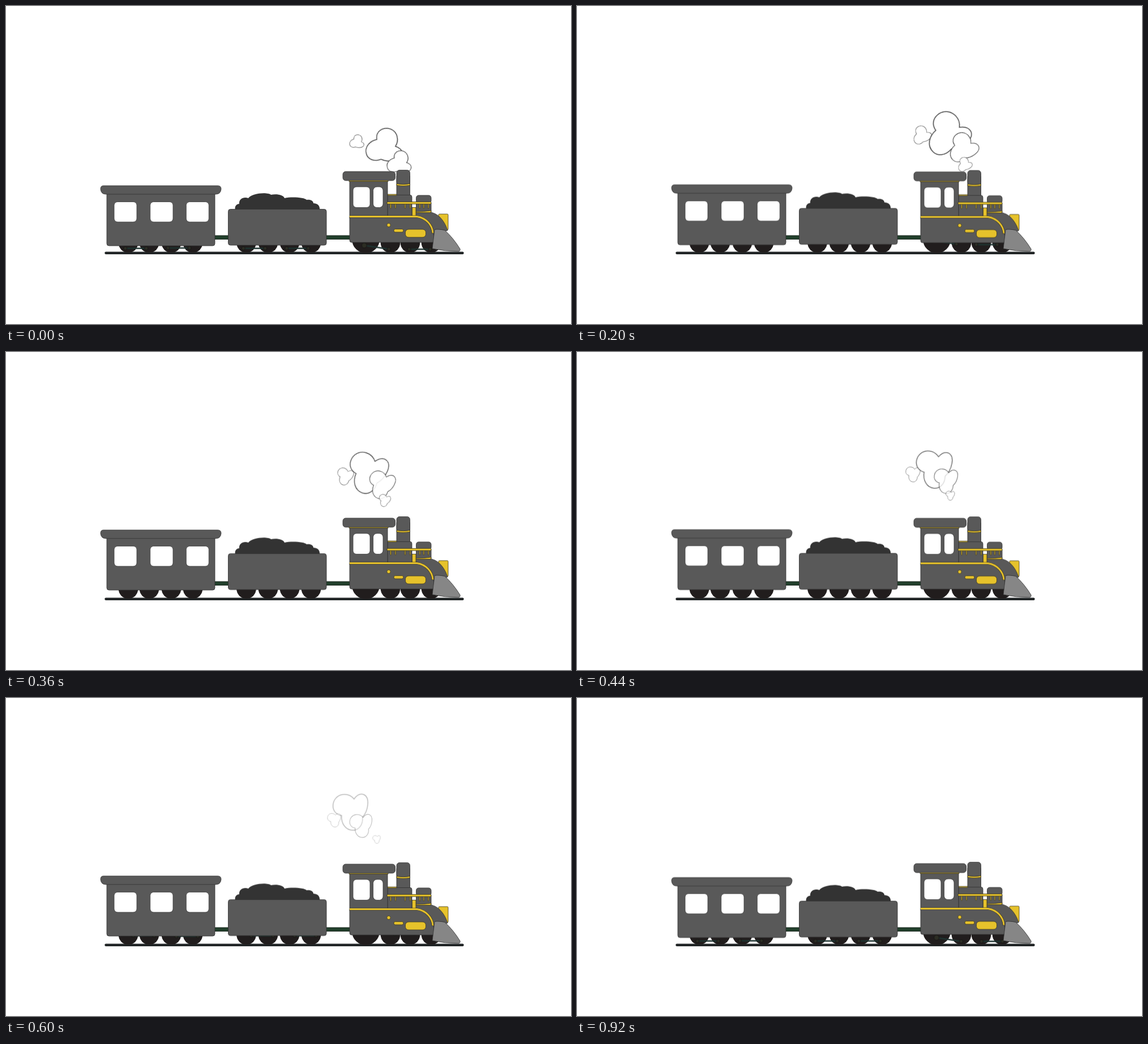
Write an HTML page that moves like this. It is 998 px wide and 561 px high and loops after 0.96 s.

```html
<!DOCTYPE html>
<html lang="en">
<head>
<meta charset="utf-8">
<title>Steam train</title>
<style>
  html, body { margin: 0; width: 100%; height: 100%; overflow: hidden; background: #fff; }
  svg { display: block; width: 100vw; height: 100vh; }
  .body { fill: #595959; stroke: #303030; stroke-width: .8; }
  .gold { fill: #e6c22b; stroke: #3a3522; stroke-width: .8; }
  .pane { fill: #fff; stroke: #3a3a3a; stroke-width: .8; }
  .wheel { fill: #211d1d; }
  .rod { stroke: #1f3431; stroke-width: 2.4; fill: none; }
  .pin { fill: #2c2d24; stroke: #141414; stroke-width: .8; }
  .puff { fill: #fff; stroke: #484848; vector-effect: non-scaling-stroke; }
  .link { fill: #22402c; stroke: #1c2820; stroke-width: 1; }
</style>
</head>
<body>
<svg viewBox="0 0 998 561" xmlns="http://www.w3.org/2000/svg">
  <g id="smoke"></g>
  <path d="M176.500 435.800H806.500" stroke="#212526" stroke-width="4.400" stroke-linecap="round"/>
  <rect class="link" x="366" y="405" width="30" height="6.500"/>
  <rect class="link" x="563" y="405" width="46" height="6.500"/>
  <g id="wheels"></g>

  <g id="coach">
    <rect class="body" x="178" y="326" width="191" height="97" rx="4"/>
    <path class="body" d="M172 317H374Q380 317 380 323Q379 332 371 332H176Q168 332 167 323Q167 317 172 317Z"/>
    <rect class="pane" x="191" y="345.500" width="40" height="35.500" rx="6"/>
    <rect class="pane" x="254.700" y="345.500" width="40.300" height="35.500" rx="6"/>
    <rect class="pane" x="318.300" y="345.500" width="40" height="35.500" rx="6"/>
  </g>

  <g id="tender">
    <path fill="#333" d="M405 360C403 353 408 349 412 349C411 341 419 336 428 339C434 330 462 328 468 333C478 331 490 333 492 339C505 336 528 338 531 342C538 341 543 344 543 348C550 348 555 352 554 360Z"/>
    <rect class="body" x="392.500" y="358.500" width="173.500" height="63.500" rx="4"/>
  </g>

  <g id="engine">
    <rect class="gold" x="764" y="367" width="17" height="28" rx="1.500"/>
    <path class="body" d="M718 370L724 364H750C765 366 776 382 780 396L753 402L735 375Z"/>
    <rect class="body" x="690" y="300" width="23.500" height="36"/>
    <rect class="body" x="690" y="289.500" width="23.500" height="26" rx="5"/>
    <path class="gold" d="M690 313.500Q701.500 316 713.500 313.500V316.500Q701.500 318.500 690 316.500Z"/>
    <path class="body" d="M674 372V333.500H714Q717 333.500 717 337V372Z"/>
    <path class="gold" d="M674 332.200H690V334H674Z"/>
    <path class="body" d="M724.500 364V347H751V364Z"/>
    <rect class="body" x="724.500" y="334" width="26.500" height="14" rx="4.500"/>
    <path class="gold" d="M724 363Q738 363 751 361Q752 364 749 364.500H724Z"/>
    <rect class="gold" x="717.500" y="355.500" width="6.500" height="16"/>
    <rect class="body" x="607" y="306" width="67" height="68"/>
    <rect class="gold" x="606" y="307.500" width="69" height="2"/>
    <rect class="body" x="595" y="292" width="92.500" height="16" rx="5"/>
    <rect class="pane" x="613" y="319" width="30" height="36.500" rx="6"/>
    <rect class="pane" x="648.500" y="319" width="17.500" height="36.500" rx="6.500"/>
    <path class="body" d="M607 371.500H727C743 374 754 386 755 400L757 417H610Q607 417 607 413Z"/>
    <path d="M607 371.500H726C742 374 753 386 754 401" fill="none" stroke="#3a3522" stroke-width="4.200"/>
    <path d="M607 371.500H726C742 374 753 386 754 400.500" fill="none" stroke="#e6c22b" stroke-width="2.800"/>
    <g id="pegs"></g>
    <rect class="gold" x="673" y="345.500" width="78" height="3.800" rx="1.500"/>
    <circle class="gold" cx="676" cy="386.500" r="3.200"/>
    <rect class="gold" x="685" y="393.500" width="17" height="5.500" rx="2.700"/>
    <rect class="gold" x="705.500" y="394" width="36" height="14" rx="5.500"/>
  </g>
  <path class="body" style="fill:#868686" d="M757 394.500Q762 393 775 395.500Q790 409 802 428.500Q803 432.500 799 432.800Q775 433 753 428Q755 412 757 394.500Z"/>
</svg>

<script>
const LOOP = 960, STEP = 40;
const el = id => document.getElementById(id);

function add(parent, tag, attrs) {
  const node = document.createElementNS("http://www.w3.org/2000/svg", tag);
  for (const key in attrs) node.setAttribute(key, attrs[key]);
  return parent.appendChild(node);
}

// Plays [time, style] pairs in 40 ms steps.
function play(node, table) {
  const keys = table.map(([time, style], i) => {
    const span = i + 1 < table.length ? table[i + 1][0] - time : STEP;
    return { ...style, offset: time / LOOP, easing: `steps(${span / STEP})` };
  });
  node.animate(keys, { duration: LOOP, iterations: Infinity });
}

// Suspension
const bob = (id, dy) => play(el(id), [0, dy, 0].map((y, i) =>
  [i * LOOP / 2, { transform: `translateY(${y}px)` }]));
bob("coach", -4);
bob("tender", -3.7);
bob("engine", 1.4);

for (const x of [679.5, 688, 705, 714, 731, 738, 746])
  add(el("pegs"), "rect", { class: "gold", x: x - .9, y: 348, width: 1.8, height: 9, rx: .9 });

// Wheels and the rods joining each pair
function pair(x1, x2, phase, big) {
  const y1 = big ? 414 : 420.5, y2 = 420.5, r = 8.8, box = el("wheels");
  add(box, "circle", { class: "wheel", cx: x1, cy: big ? 411.5 : 418, r: big ? 24.5 : 17.3 });
  add(box, "circle", { class: "wheel", cx: x2, cy: 418, r: 17.3 });
  const rod = add(box, "g", {});
  add(rod, "path", { class: "rod", d: `M${x1} ${y1}L${x2} ${y2}` });
  add(rod, "circle", { class: "pin", cx: x1, cy: y1, r: big ? 4.5 : 3 });
  add(rod, "circle", { class: "pin", cx: x2, cy: y2, r: 3 });
  play(rod, [0, 1].map(turn => {
    const a = phase + 360 * turn;
    return [turn * LOOP, { transform: `rotate(${a}deg) translateY(${r}px) rotate(${-a}deg)` }];
  }));
}
pair(216, 253, 37);
pair(292, 330, 43);
pair(424.5, 463, 37);
pair(501, 539, 37);
pair(635.5, 679, 18, true);
pair(714, 751, 12);

// Smoke: one three-lobed puff, turning, drifting and fading
const PUFF = "M-16 6C-38 3 -35 -28 -14 -31C-5 -32 2 -28 6 -23C11 -30 17 -33 23 -31C35 -26 31 -2 21 9C22 23 14 32 4 32C-9 32 -17 20 -16 6Z";
const TIMES = [0, 120, 280, 440, 600, 760, 920, 960];
const TURN = [73, 57, 34, 6, 0, 0, 0, 0];
const FADE = [1, 1, 1, .75, .37, .08, 0, 0];

function puff(width, path) {
  const node = add(el("smoke"), "path", { class: "puff", d: PUFF, "stroke-width": width });
  play(node, TIMES.map((time, i) => {
    const [x, y, s] = path[Math.min(i, path.length - 1)];
    return [time, {
      transform: `translate(${x}px, ${y}px) rotate(${TURN[i]}deg) scale(${s})`,
      opacity: FADE[i]
    }];
  }));
}
puff(.8, [[618.5, 240, .38], [612, 234, .48], [603, 224, .5], [593, 216, .41], [579.7, 215.5, .38], [570, 224, .37]]);
puff(1.5, [[665, 248.5, .965], [659.5, 234.5, 1.15], [644, 221, 1.16], [630, 207.5, 1.02], [608.7, 201.3, 1], [594, 206, 1]]);
puff(1.1, [[692.5, 277, .64], [686, 261, .77], [673, 242, .8], [651, 228, .67], [627, 225.5, .64], [627.5, 225.5, .62]]);
puff(.7, [[700, 302, .3], [690, 290, .36], [677, 271, .4], [659, 253.5, .25], [654.5, 249.5, .22], [656, 248.5, .22]]);
</script>
</body>
</html>
```
